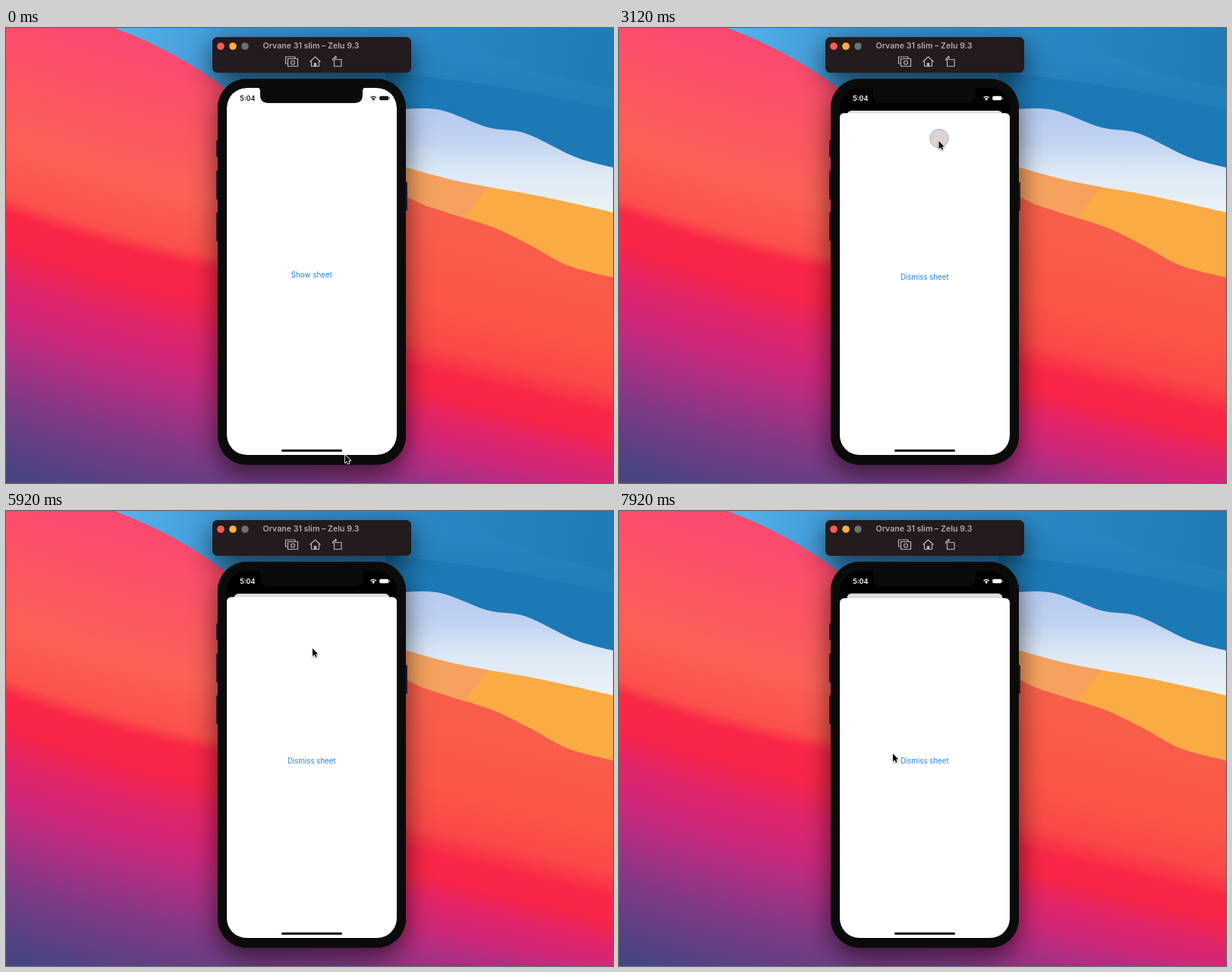
An HTML page with a canvas that plays this animation: 800 by 600 pixels, repeating every 8000 ms.

```html
<!DOCTYPE html>
<html lang="en">
<head>
<meta charset="utf-8">
<title>Sheet demo</title>
<style>
html, body { margin: 0; width: 100%; height: 100%; overflow: hidden; background: #000; }
canvas { display: block; width: 800px; height: 600px; }
</style>
</head>
<body>
<canvas id="stage" width="800" height="600"></canvas>
<script>
const LOOP = 8000, STEP = 80;
const FONT = 'Inter, "Liberation Sans", sans-serif';
const LINK = '#1f80dc', CASE = '#0b0b0b', ICON = '#bdb2b6';
const stage = document.getElementById('stage').getContext('2d');
const backdrop = document.createElement('canvas');
backdrop.width = 800;
backdrop.height = 600;

const lerp = (a, b, u) => a + (b - a) * u;
const clamp = (v, a, b) => Math.min(b, Math.max(a, v));
const ease = u => u * u * (3 - 2 * u);

function box(c, x, y, w, h, r, fill) {
  c.beginPath();
  c.roundRect(x, y, w, h, r);
  if (fill) { c.fillStyle = fill; c.fill(); }
}

function disc(c, x, y, r, fill) {
  c.beginPath();
  c.arc(x, y, r, 0, Math.PI * 2);
  c.fillStyle = fill;
  c.fill();
}

function label(c, text, x, y, size, weight, color) {
  c.font = `${weight} ${size}px ${FONT}`;
  c.textAlign = 'center';
  c.fillStyle = color;
  c.fillText(text, x, y);
}

function gradient(c, x0, y0, x1, y1, ...colors) {
  const g = c.createLinearGradient(x0, y0, x1, y1);
  colors.forEach((color, i) => g.addColorStop(i / (colors.length - 1), color));
  return g;
}

// Everything below a smooth edge through the points.
function below(c, pts, fill) {
  c.beginPath();
  c.moveTo(...pts[0]);
  for (let i = 0; i < pts.length - 1; i++) {
    const a = pts[i - 1] || pts[i], b = pts[i], d = pts[i + 1], e = pts[i + 2] || d;
    c.bezierCurveTo(b[0] + (d[0] - a[0]) / 6, b[1] + (d[1] - a[1]) / 6,
      d[0] - (e[0] - b[0]) / 6, d[1] - (e[1] - b[1]) / 6, d[0], d[1]);
  }
  c.lineTo(800, 600);
  c.lineTo(pts[0][0], 600);
  c.closePath();
  if (fill) { c.fillStyle = fill; c.fill(); }
}

// Band colours with their depth below the start of the red.
const LOWER = [['#f92646', 0], ['#f72549', 40], ['#e0256a', 90], ['#d02779', 135],
  ['#a93084', 190], ['#7c3a84', 250], ['#484582', 340]];

function bands(c, from, to, edge, scale, upper) {
  for (let x = from; x < to; x += 2) {
    const g = c.createLinearGradient(0, edge(x) - 400, 0, edge(x) + 400);
    for (const [color, depth] of [...upper, ...LOWER])
      g.addColorStop(0.5 + depth * scale / 800, color);
    c.fillStyle = g;
    c.fillRect(x, 0, 2, 600);
  }
}

function clipped(c, draw) {
  c.save();
  c.clip();
  draw();
  c.restore();
}

function paintWallpaper(c) {
  c.fillStyle = gradient(c, 150, 0, 800, 120, '#58b2ea', '#3b94d2', '#2f8bc8', '#2782be', '#1f79b5');
  c.fillRect(0, 0, 800, 600);
  below(c, [[500, 6], [600, 22], [720, 62], [800, 80]], gradient(c, 0, 10, 0, 150, '#2b88c4', '#1b78b3'));
  below(c, [[500, 58], [640, 76], [800, 108]], '#1c79b5');
  below(c, [[520, 107], [572, 108], [635, 131], [685, 139], [750, 170], [800, 184]],
    gradient(c, 0, 105, 0, 235, '#b5c9f0', '#c0d3f1', '#dde9f6', '#eaf1f6'));
  below(c, [[520, 182], [600, 203], [700, 221], [800, 243]], '#fbab44');
  clipped(c, () => {
    c.beginPath();
    c.moveTo(500, 150);
    c.lineTo(650, 190);
    c.lineTo(600, 256);
    c.lineTo(500, 256);
    c.fillStyle = '#f5a25f';
    c.fill();
  });

  below(c, [[404, 150], [527, 222], [580, 243], [640, 262], [690, 286], [740, 313], [800, 329]]);
  clipped(c, () => bands(c, 404, 800, x => 445 + 0.245 * (x - 527), 0.7,
    [['#f7604a', -320], ['#fb5545', -130], ['#fb4848', -50]]));

  c.beginPath();
  c.moveTo(143, 0);
  c.quadraticCurveTo(222, 29, 290, 80);
  c.lineTo(404, 190);
  c.lineTo(404, 600);
  c.lineTo(0, 600);
  c.lineTo(0, 0);
  clipped(c, () => bands(c, 0, 404, x => 243 + 0.36 * x - 0.0003 * x * x, 1,
    [['#fb4a70', -265], ['#fb5562', -180], ['#fa6156', -95], ['#fb504b', -20]]));
}

function strokePath(c, d) {
  c.stroke(new Path2D(d));
}

function paintToolbar(c) {
  ['#fc5b53', '#fcb03e', '#68736c'].forEach((color, i) => disc(c, 283 + 16 * i, 24, 4.8, color));
  label(c, 'Orvane 31 slim – Zelu 9.3', 402, 27, 10.6, 600, '#b5a8ac');
  c.strokeStyle = ICON;
  c.lineWidth = 1.2;
  c.lineJoin = 'round';
  strokePath(c, 'M370.5 47h-2v-9h12.5v2M371.5 40.5h13v10h-13z');
  c.beginPath();
  c.arc(378, 45.5, 2.5, 0, Math.PI * 2);
  c.stroke();
  strokePath(c, 'M400.5 44.5l7-6.5 7 6.5M402.5 43.5v7h10v-7');
  box(c, 405.8, 46, 3.4, 4.5, 0, ICON);
  strokePath(c, 'M432.5 41.5h9.5v9h-9.5zM430.5 43q0-4.4 5-4.4M433.6 36.8l2 1.8-2 1.8');
}

function paintBackdrop(c) {
  paintWallpaper(c);
  const phone = () => box(c, 279, 67, 248, 509, 38, CASE);
  const bar = () => box(c, 272, 12, 262, 47, 7, '#231b1d');
  c.save();
  c.shadowColor = 'rgba(0,0,0,.6)';
  c.shadowBlur = 34;
  c.shadowOffsetY = 11;
  phone();
  bar();
  c.restore();
  for (const [x, y, h] of [[277, 148, 22], [277, 188, 38], [277, 243, 38], [526, 203, 38]])
    box(c, x, y, 3, h, 1, '#2a1a30');
  phone();
  bar();
  paintToolbar(c);
}

// The pointer takes `move` ms to reach `from`, presses, then slides to `to`.
const GESTURES = [
  { press: 840, hold: 110, slide: 110, move: 600, from: [405, 331], to: [405, 331] },
  { press: 3040, hold: 1360, slide: 960, move: 900, from: [422, 145], to: [398, 349] },
  { press: 5080, hold: 460, slide: 460, move: 400, from: [404, 181], to: [402, 300] },
  { press: 6000, hold: 460, slide: 460, move: 320, from: [404, 181], to: [402, 300] },
  { press: 7150, hold: 460, slide: 460, move: 480, from: [358, 207], to: [361, 320] }
];
const [TAP, ...DRAGS] = GESTURES;
const HOME = [447, 563], SETTLE = 80, DOT_LAG = 48;
const TRAVEL = 451, REST = 112, DRAG_RATIO = 0.28, SPRING = 0.0125;

const held = (t, g) => t >= g.press && t < g.press + g.hold;

function pointer(t) {
  let pos = HOME;
  const glide = (to, start, span) => {
    const u = ease(clamp((t - start) / span, 0, 1));
    pos = pos.map((v, i) => lerp(v, to[i], u));
  };
  for (const g of GESTURES) {
    glide(g.from, g.press - SETTLE - g.move, g.move);
    glide(g.to, g.press, g.slide);
  }
  return pos;
}

// The touch dot trails the pointer a little.
const touch = t => pointer(t - DOT_LAG);

// Critically damped return to rest.
function spring(dt) {
  const k = SPRING * Math.max(0, dt);
  return (1 + k) * Math.exp(-k);
}

function sheetOffset(t) {
  let y = TRAVEL * spring(t - TAP.press - TAP.hold);
  for (const g of DRAGS) {
    if (t < g.press) continue;
    const end = g.press + g.hold;
    y += DRAG_RATIO * (touch(Math.min(t, end))[1] - g.from[1]) * spring(t - end);
  }
  return y;
}

function drawStatus(c, color, dots) {
  label(c, '5:04', 318.3, 95.6, 9, 600, color);
  if (dots) for (let i = 0; i < 4; i++) disc(c, 470 + i * 2.4, 94.5, 0.6, '#b5b5b8');
  c.strokeStyle = color;
  c.lineWidth = 1.3;
  for (const r of [2.7, 5]) {
    c.beginPath();
    c.arc(484.2, 95.4, r, -Math.PI * 0.76, -Math.PI * 0.24);
    c.stroke();
  }
  disc(c, 484.2, 94.7, 1.1, color);
  box(c, 492.3, 89.7, 12, 5.6, 1.6, color);
  box(c, 505, 91.5, 0.9, 2, 0.4, color);
}

function drawScreen(c, t) {
  const off = sheetOffset(t), p = 1 - off / TRAVEL;
  c.save();
  box(c, 291, 79, 224, 484, 26, '#000');
  c.clip();

  // Presenting view shrinks into a dimmed card as the sheet rises.
  const inset = 9.5 * p, top = 79 + 30 * p, scale = 1 - 0.085 * p;
  const shade = Math.round(255 - 34 * p);
  box(c, 291 + inset, top, 224 - 2 * inset, 484 * scale, lerp(26, 6, p), `rgb(${shade},${shade},${shade})`);
  c.globalAlpha = held(t, TAP) ? 0.3 : 1;
  label(c, 'Show sheet', 402.8, top + 250.4 * scale, 9.8 * scale, 400, LINK);
  c.globalAlpha = 1;

  if (off < TRAVEL) {
    box(c, 291, REST + off, 224, 600, 5.5, '#fff');
    label(c, 'Dismiss sheet', 402.8, 331.8 + off / 2, 9.7, 400, LINK);
  }

  c.fillStyle = CASE;
  c.fill(new Path2D('M331 78q4 1 4 5v5q0 11 11 11h113q11 0 11-11v-5q0-4 4-5z'));
  drawStatus(c, p > 0.5 ? '#fff' : '#15151a', p <= 0.5);
  box(c, 363, 555.8, 80, 3, 1.5, '#060606');
  c.restore();
}

const ARROW = new Path2D('M0 0v10.4l2.4-2.2 1.6 3.6 1.7-.7-1.5-3.5h3.1z');

function drawPointer(c, t) {
  if (GESTURES.some(g => held(t, g))) {
    disc(c, ...touch(t), 12.2, 'rgba(214,206,204,.88)');
    c.strokeStyle = '#a9acb6';
    c.lineWidth = 1;
    c.stroke();
  }
  c.save();
  c.translate(...pointer(t));
  c.lineJoin = 'round';
  c.lineWidth = 1.6;
  c.strokeStyle = '#fff';
  c.shadowColor = 'rgba(0,0,0,.4)';
  c.shadowBlur = 2;
  c.shadowOffsetY = 1;
  c.stroke(ARROW);
  c.shadowColor = 'transparent';
  c.fillStyle = '#08080c';
  c.fill(ARROW);
  c.restore();
}

paintBackdrop(backdrop.getContext('2d'));

const start = performance.now();
function frame() {
  const now = Math.max(0, performance.now() - start) % LOOP;
  const t = Math.floor(now / STEP) * STEP;
  stage.drawImage(backdrop, 0, 0);
  drawScreen(stage, t);
  drawPointer(stage, t);
  requestAnimationFrame(frame);
}
frame();
</script>
</body>
</html>
```
